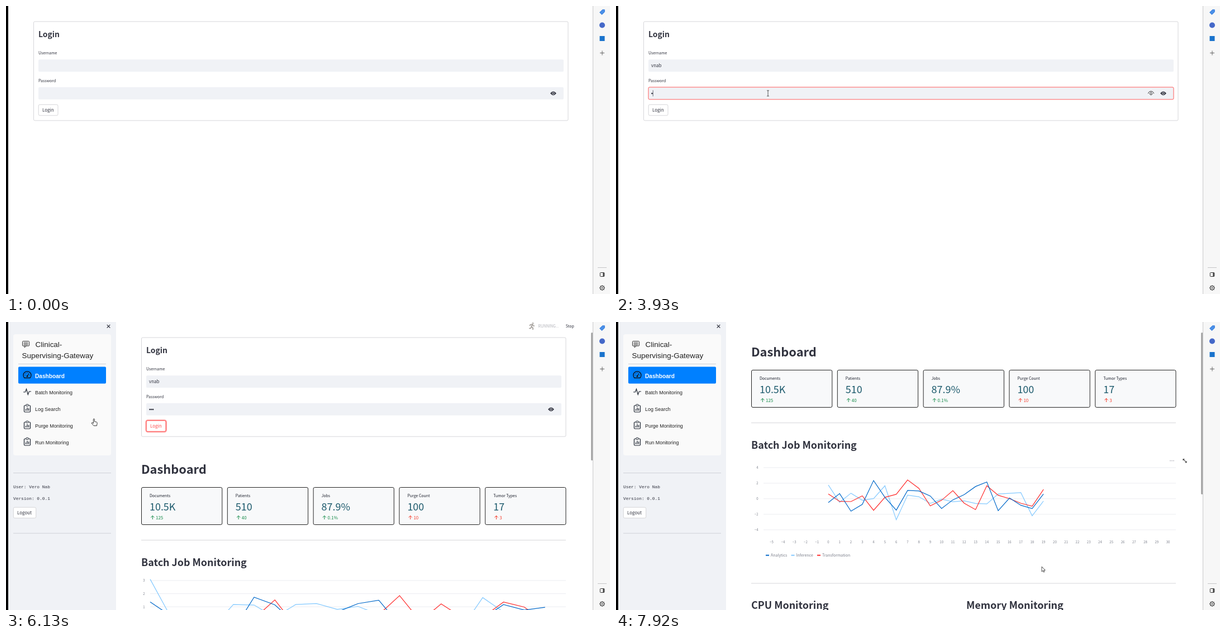
An HTML page that plays this animation: 1081 by 518 pixels, repeating every 7990 ms.

```html
<!DOCTYPE html>
<html lang="en">
<head>
<meta charset="utf-8">
<title>Dashboard login</title>
<style>
  html, body { margin: 0; width: 100%; height: 100%; overflow: hidden; background: #fff; }
  svg { display: block; }
  text { font-family: "Noto Sans CJK JP", "Noto Sans CJK SC", "Noto Sans CJK", "Open Sans", sans-serif; white-space: pre; }
  .menu { font-family: "Liberation Sans", Arial, sans-serif; }
  .code { font-family: "Liberation Mono", "Noto Sans Mono", monospace; }
</style>
</head>
<body>
<svg id="stage" width="1081" height="518" viewBox="0 0 1081 518"></svg>
<script>
const LOOP = 7990, TICK = LOOP / 120;
const INK = '#31333f', RED = '#ff4b4b', FIELD = '#f0f2f6', LINE = '#d6d6d9';
const USER = 'vnab', FULL_NAME = 'Vero Nab';

// Moments of the story, in ms
const AT = {
  userFocus: 740, passFocus: 3400, hover: 4600, press: 5070, release: 5130, running: 5200,
  slide: 5270, slid: 5460, cards: 5400, charts: 5860, menu: 5930, formGone: 6330, idle: 6720,
  chartHover: 6850, linkGone: 7190
};
const USER_KEYS = [1610, 1810, 1940, 2070];
const PASS_KEYS = [3930, 4000, 4130];
const ZOOMS = [6910, 6980, 7390, 7450, 7520, 7590];

// Pointer: time, x, y, shape from here on
const POINTER = [
  [70, 430, 452, 'arrow'], [540, 352, 150, 'arrow'], [610, 343, 110, 'beam'], [740, 341, 99, 'beam'],
  [2600, 341, 99, 'beam'], [2670, 334, 108, 'arrow'], [2875, 291, 137, 'arrow'], [3000, 273, 143, 'arrow'],
  [3130, 273, 143, 'arrow'], [3270, 272, 152, 'beam'], [3400, 272, 157, 'beam'], [4320, 272, 157, 'beam'],
  [4470, 200, 170, 'arrow'], [4670, 80, 186, 'hand'], [4730, 75, 188, 'hand'], [5130, 75, 188, 'hand'],
  [5270, 150, 190, 'arrow'], [5530, 326, 187, 'arrow'], [5700, 326, 187, 'arrow'], [5860, 262, 185, 'arrow'],
  [6000, 190, 178, 'hand'], [6135, 158, 175, 'hand'], [6270, 140, 150, 'hand'], [6400, 120, 104, 'hand'],
  [6530, 230, 100, 'arrow'], [6720, 420, 98, 'arrow'], [6850, 455, 170, 'arrow'], [6980, 490, 258, 'arrow'],
  [7070, 499, 279, 'arrow'], [7190, 532, 353, 'arrow'], [7380, 532, 353, 'arrow'], [7650, 600, 390, 'arrow'],
  [7925, 762, 440, 'arrow']
];

const SERIES = [
  { name: 'Inference', color: '#83c9ff',
    first: { 0: 3.1, 1: .2, 4: 1.17, 5: 1.13, 6: .2, 7: 1.17, 8: 1.25, 9: .8, 10: 1.03, 11: .4, 16: 1.7, 17: .6 },
    data: [1.76, -.46, .71, -.2, .01, 1.67, -2.7, .47, .25, -.6, -.06, -.39, -.27, -.61, -.66, .61, .7, .78, -2.19, -.3] },
  { name: 'Transformation', color: '#ff2b2b',
    first: { 5: .1, 6: 1.52, 7: -.5, 11: .4, 12: 1.85, 13: -.1, 14: 1.22, 15: .2, 16: .2, 17: 1.36, 18: .98, 19: -.2 },
    data: [.61, -.35, -.37, .37, -1.49, .18, .57, 2.41, 1.33, -.92, -.2, 1.04, -.58, -1.4, 1.67, .45, 0, -.58, -.97, 1.19] },
  { name: 'Analytics', color: '#0068c9',
    first: { 0: 1.37, 1: .3, 4: -.8, 5: 1.73, 6: 1.15, 7: -.3, 9: .6, 10: 1.24, 11: 1.5, 12: -.4, 16: .1, 17: 1.17, 18: .75, 19: .96 },
    data: [-.5, .66, -1.6, -.73, 2.34, .18, -1.47, 1.07, 1, .35, -1.26, -.15, .52, 1.57, 2.15, -1.54, .09, -.85, -1.26, .61] }
];

const METRICS = [
  ['Documents', '10.5K', '125', 1], ['Patients', '510', '40', 1], ['Jobs', '87.9%', '0.1%', 1],
  ['Purge Count', '100', '10', 0], ['Tumor Types', '17', '3', 0]
];

const rect = (x, y, w, h, fill, more = '') =>
  `<rect x="${x}" y="${y}" width="${w}" height="${h}" fill="${fill}" ${more}/>`;
const path = (d, stroke = INK, w = 1, more = 'fill="none"') =>
  `<path d="${d}" stroke="${stroke}" stroke-width="${w}" ${more}/>`;
const group = (x, y, body) => `<g transform="translate(${x} ${y})">${body}</g>`;
const raw = (x, y, size, str, fill, more = '') =>
  `<text x="${x}" y="${y}" font-size="${size}" fill="${fill}" ${more}>${str}</text>`;
// The CJK face carries Latin letters drawn about 1.117 times larger
const text = (x, y, size, str, fill = INK, more = '') => raw(x, y, (size / 1.117).toFixed(2), str, fill, more);
const bold = (x, y, size, str) => text(x, y, size, str, INK, 'font-weight="700"');
const rule = (x1, x2, y) => path(`M${x1} ${y}H${x2}`, LINE);
const count = (times, t) => times.filter(k => t >= k).length;

function browserBar() {
  const gear = [...Array(8)].map((_, i) =>
    `<path d="M0 -3.4V-4.8" transform="rotate(${i * 45})" stroke="#333" stroke-width="1.5"/>`).join('');
  return rect(1050, 0, 31, 518, '#f7f7f7') + path('M1050.5 0V518', '#c8c8ca') +
    group(1067, 11, path('M-4.5 .5L.5 -4.3L4.3 -4.3V-.2L-.6 4.5Z', '#3d7fdc', 1, 'fill="#4a90e8" stroke-linejoin="round"')) +
    '<circle cx="1067" cy="34.5" r="5" fill="#4468c8"/>' + rect(1062.5, 54, 9, 9, '#1a73cc') +
    path('M1063 84.5h8M1067 80.5v8', '#555', .9) + path('M1059 470.5h16', '#c4c4c6') +
    rect(1063.3, 479.5, 7.6, 7, 'none', 'rx="1" stroke="#333"') + rect(1068.4, 480, 2, 6, '#333') +
    group(1067, 507, gear + '<circle r="3.5" fill="none" stroke="#333"/><circle r="1.2" fill="none" stroke="#333" stroke-width=".8"/>');
}

function eye(x) {
  return group(x, 157, `<path d="M-5.5 0Q0 -7 5.5 0Q0 7 -5.5 0Z" fill="${INK}"/>` +
    '<circle r="2.2" fill="#f0f2f6"/>' + `<circle r="1.4" fill="${INK}"/>`);
}

function field(L, R, y, focus) {
  return rect(L + 9, y, R - L - 17, 22, FIELD, `rx="2" ${focus ? `stroke="${RED}" stroke-width=".9"` : ''}`);
}

function form(t, L, R) {
  const inUser = t >= AT.userFocus && t < AT.passFocus;
  const inPass = t >= AT.passFocus && t < AT.press;
  const typed = count(USER_KEYS, t), dots = count(PASS_KEYS, t);
  const caretOn = inUser ? t < 1270 || (t >= 1610 && t < 2610) || t >= 3140 : inPass && t < 4870;
  const caretX = L + 14.5 + (inUser ? typed * 4.6 : dots * 2.7), caretY = inUser ? 101.5 : 151.5;
  const pressed = t >= AT.press && t < AT.release, hot = t >= AT.hover;
  let s = rect(L + .5, 28, R - L - .5, 178, '#fff', `rx="2" stroke="${LINE}"`) +
    bold(L + 9, 56, 15.5, 'Login') +
    text(L + 9, 87.3, 7.8, 'Username') + field(L, R, 96.3, inUser) +
    text(L + 14, 110.2, 8.9, USER.slice(0, typed)) +
    text(L + 9, 137.3, 7.8, 'Password') + field(L, R, 146, inPass) + eye(R - 26.5);
  for (let i = 0; i < dots; i++) s += `<circle cx="${L + 15.5 + i * 2.8}" cy="157.3" r="1.25" fill="${INK}"/>`;
  if (inPass && dots) {
    s += group(R - 48.5, 157, path('M-5 .5Q-4 -3.6 0 -3.6T5 .5', '#222', 1) +
      '<circle cy=".8" r="2" fill="none" stroke="#222"/>');
  }
  if (caretOn) s += path(`M${caretX} ${caretY}v11`, INK, .7);
  if (t >= AT.release) s += rect(L + 8.6, 176.7, 36.2, 20.8, 'none', 'rx="3" stroke="#ffa5a5" stroke-width="2.4"');
  s += rect(L + 9.2, 177.3, 34.8, 19.6, pressed ? RED : '#fff', `rx="2.5" stroke="${hot ? RED : LINE}"`) +
    text(L + 16, 190.2, 8.9, 'Login', pressed ? '#fff' : hot ? RED : INK);
  return s;
}

function cards(L, R) {
  const w = (R - L - 36) / 5;
  return METRICS.map(([label, value, delta, good], i) => {
    const c = good ? '#138a48' : '#f53d2c';
    return group(L + i * (w + 9), 86,
      rect(.5, .5, w - .5, 67, '#f8f9fa', 'rx="2.5" stroke="#222"') +
      text(15, 17.5, 7.8, label, '#1c202c') + text(15, 41.5, 20, value, '#1c5a6c') +
      path('M20.3 58V51.7M17.2 54.6L20.3 51.5L23.4 54.6', c, 1) + text(26, 58, 8.9, delta, c));
  }).join('');
}

function chart(t, first) {
  const left = first ? 258 : 264, right = 1002, top = 245, bottom = 383;
  const n = count(ZOOMS, t), a = 1.105 ** Math.min(n, 2), b = 1.105 ** Math.max(n - 2, 0);
  let x0 = 258, y0 = 324.8, sx = 37.2, sy = 23.6;
  if (!first) {
    // Wheel zoom keeps the point under the pointer in place
    x0 = 491 - 227 / a; y0 = 274.5 + 32.1 / a;
    x0 = 532.5 - (532.5 - x0) / b; y0 = 352.6 - (352.6 - y0) / b;
    sx = 36.9 / (a * b); sy = 25.48 / (a * b);
  }
  const sign = v => v < 0 ? '−' + -v : v;
  const tick = (x, y, v, anchor) => text(x, y, 6.7, sign(v), '#7d808c', `text-anchor="${anchor}"`);
  const step = (bottom - top) / sy > 7.07 ? 2 : 1;
  let s = '';
  for (let v = -12; v <= 12; v += step) {
    const y = y0 - v * sy;
    if (y >= top && y <= bottom + .5) s += path(`M${left} ${y.toFixed(1)}H${right}`, '#e6e8ee', .8) + tick(left - 9.5, y + 2.3, v, 'end');
  }
  let labels = '';
  for (let v = -10; v <= 40; v++) {
    const x = x0 + v * sx;
    if (x >= left - .5 && x <= right + .5) labels += tick(x.toFixed(1), 397.5, v, 'middle');
  }
  s += `<g clip-path="url(#axis)">${labels}</g>`;
  const lines = SERIES.map(({ color, data, first: early }) => {
    const pts = data.map((v, i) => {
      const val = first ? early[i] ?? -.6 : v;
      return `${(x0 + i * sx).toFixed(1)},${(y0 - val * sy).toFixed(1)}`;
    });
    return `<polyline points="${pts.join(' ')}" fill="none" stroke="${color}" stroke-width="1.2"/>`;
  });
  s += `<g clip-path="url(#plot)">${first ? lines.join('') : lines[0] + lines[1] + lines[2]}</g>`;
  [[2, 268], [0, 313.5], [1, 360]].forEach(([i, x]) => {
    s += rect(x, 418.6, 6, 2, SERIES[i].color) + text(x + 9, 422.2, 7.8, SERIES[i].name, '#7d808c');
  });
  return s;
}

function board(t, L, R) {
  const early = t < AT.formGone;
  let s = bold(L, 62, 24.4, 'Dashboard') + cards(L, R) + rule(L, R, 181.3);
  if (t >= AT.charts) {
    s += bold(L, 227.8, 20, 'Batch Job Monitoring') + chart(t, early) + rule(L, R, 470) +
      bold(L, 516.3, 20, 'CPU Monitoring') + bold(627, 516.3, 20, 'Memory Monitoring');
  }
  if (t >= AT.chartHover) {
    s += [992, 995, 998].map(x => `<circle cx="${x}" cy="249.5" r=".9" fill="#b9bac2"/>`).join('') +
      path('M1015 249V246.5H1017.5M1015 246.5L1021 252.7M1021 250.2V252.7H1018.5', '#444', 1.1);
    if (t < AT.linkGone) {
      s += `<g transform="translate(226.5 221) rotate(-40)" fill="none" stroke="#a4a5ad" stroke-width="1">` +
        '<path d="M-.5 -1.8H-2.8A1.8 1.8 0 0 0 -2.8 1.8H-.5M.5 -1.8H2.8A1.8 1.8 0 0 1 2.8 1.8H.5M-2 0H2"/></g>';
    }
  }
  return group(0, early ? 211 : 0, s);
}

function menu() {
  const item = (y, str) => raw(52, y, 8.92, str, '#222', 'class="menu"');
  const clip = y => group(38, y, rect(-5.5, -5.5, 11, 12, 'none', 'rx="1.5" stroke="#1c2430" stroke-width="1.2"') +
    rect(-2.2, -7.3, 4.4, 3, '#fafafa', 'rx="1" stroke="#1c2430"') +
    path('M-2.6 4V1.2M0 4V-1.8M2.6 4V-.2', '#1c2430', 1.3));
  const mono = (y, str) => raw(13, y, 7.85, str, INK, 'class="code"');
  return rect(13, 22, 175, 218, '#fafafa', 'rx="4"') +
    group(35.5, 40, rect(-6, -5.5, 12, 8.5, 'none', 'rx="1" stroke="#333"') +
      path('M-4 -3H4M-4 -1H4M-4 1H4M-2.5 3V6L1 3', '#333', .9)) +
    raw(52.5, 45, 13.45, 'Clinical-', '#222', 'class="menu"') +
    raw(28.5, 65.2, 13.45, 'Supervising-Gateway', '#222', 'class="menu"') +
    path('M22 75.5H179', '#cfd0d3') + rect(22, 80.5, 157, 30.2, '#0080ff', 'rx="2"') +
    group(38, 95.5, path('M-5.2 5A7 7 0 1 1 5.2 5Z', '#111', 1.3) + path('M0 2L3 -3M-4.5 0h1M-3 -3.4l.7.7M0 -5v1M3.6 0h1', '#111', 1.1) +
      '<circle cy="2" r="1.4" fill="#111"/>') +
    raw(52, 100.8, 10.15, 'Dashboard', '#fff', 'class="menu" font-weight="700"') +
    path('M31 126H34.5L36.5 120.5L39.3 130.5L41.3 125H45', '#1c2430', 1.2) +
    item(130.3, 'Batch Monitoring') + item(160.2, 'Log Search') + item(190.3, 'Purge Monitoring') + item(220.2, 'Run Monitoring') +
    clip(155.5) + clip(185.5) + clip(215.5) +
    path('M13 271.5H188M13 380H188', '#cfd1d8') +
    mono(299, 'User: ' + FULL_NAME) + mono(320.3, 'Version: 0.0.1') +
    rect(13.3, 333.3, 40.4, 19.4, '#fff', `rx="2.5" stroke="${LINE}"`) + text(20, 346, 8.9, 'Logout');
}

function running(t) {
  const bike = '<circle cx="-4.2" cy="3" r="3"/><circle cx="4.2" cy="3" r="3"/><path d="M-4.2 3L-1 -1L1.5 3M-1 -1L1.5 -4.5L4 -1.5H6M1.5 -4.5L4.2 3"/><circle cx="3.3" cy="-5.3" r=".9"/>';
  const runner = '<circle cx="2" cy="-5" r="1.2"/><path d="M1 -3L-.8 1L2 3V6.5M-.8 1L-2 4H-5M-4 -1L-1.8 -3H1L3 -.5H5" stroke-width="1.7"/>';
  return `<g transform="translate(941 7.5)" fill="none" stroke="#a39e9a" stroke-width="1">${t < 5800 ? bike : runner}</g>` +
    text(952.5, 10.3, 7.8, 'RUNNING...', '#b0b1b8') + text(1001.8, 10.3, 7.8, 'Stop');
}

const SHAPES = {
  arrow: path('M0 0V9L2.1 7.1L3.4 10L4.8 9.4L3.6 6.6L6.2 6.4Z', '#222', .8, 'fill="#fff" stroke-linejoin="round"'),
  hand: path('M-1 1A1 1 0 0 1 1 1V5L5 6Q6 6.4 5.8 7.6L5 12.5H-.4L-4.2 8Q-4 6.4 -2.4 7.1L-1 8.2Z', '#222', .9, 'fill="#fff" stroke-linejoin="round"'),
  beam: path('M-2 -5H2M0 -5V5M-2 5H2', '#333', .8)
};

function pointer(t) {
  const i = count(POINTER.map(k => k[0]), t) - 1;
  if (i < 0) return '';
  const [t0, x0, y0, shape] = POINTER[i], [t1, x1, y1] = POINTER[i + 1] || [LOOP + 1, x0, y0];
  const p = (t - t0) / (t1 - t0);
  return group((x0 + (x1 - x0) * p).toFixed(1), (y0 + (y1 - y0) * p).toFixed(1), SHAPES[shape]);
}

const DEFS = '<defs><clipPath id="plot"><rect x="256" y="245" width="746" height="138.5"/></clipPath>' +
  '<clipPath id="axis"><rect x="240" y="385" width="762" height="20"/></clipPath></defs>';

function scene(t) {
  const slide = Math.min(1, Math.max(0, (t - AT.slide) / (AT.slid - AT.slide)));
  const L = 49 + 193 * slide, R = t >= AT.charts ? 1002 : 1006;
  let s = DEFS + rect(0, 0, 1081, 518, '#fff');
  if (slide) {
    s += rect(4, 0, L - 49, 518, FIELD) + group(L - 58.5, 7.7, path('M-2.8 -2.8L2.8 2.8M2.8 -2.8L-2.8 2.8', INK, 1.1));
  }
  if (t < AT.formGone) s += form(t, L, R);
  if (t >= AT.cards) s += board(t, L, R);
  if (t >= AT.running && t < AT.idle) s += running(t);
  if (t >= AT.menu) s += menu();
  if (t >= AT.charts) s += rect(1047, 19, 3.4, t < AT.formGone ? 230 : 291, '#a8a8a8', 'rx="1.5"');
  return s + rect(0, 0, 4, 518, '#000') + browserBar() + pointer(t);
}

const stage = document.getElementById('stage');
const start = performance.now();
let shown = -1;
function draw() {
  const t = (performance.now() - start) % LOOP;
  // The screen refreshes about 15 times a second
  const tick = Math.floor((t + 10) / TICK) % 120;
  if (tick !== shown) {
    stage.innerHTML = scene(tick * TICK + 14);
    shown = tick;
  }
  requestAnimationFrame(draw);
}
draw();
</script>
</body>
</html>
```
